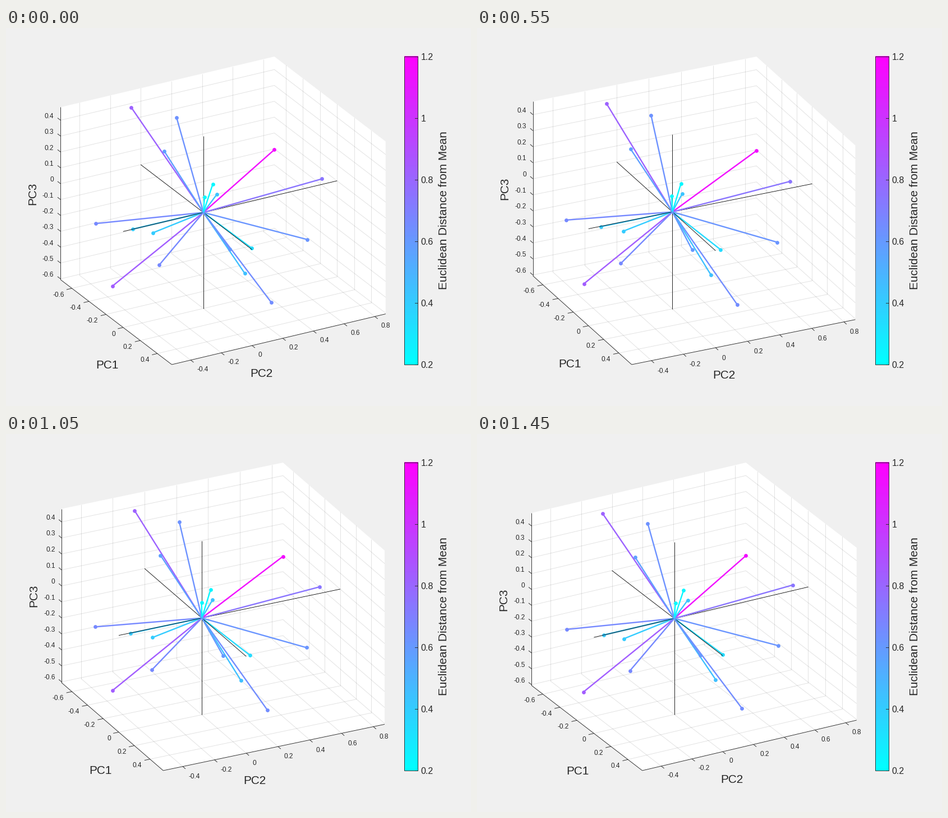
A matplotlib script that plays this animation: 829 by 675 pixels, repeating every 1500 ms.

```python
import numpy as np
import matplotlib.pyplot as plt
from matplotlib.animation import FuncAnimation
from matplotlib.collections import LineCollection

W, H, DPI = 829, 675, 100
PX = 72 / DPI
FRAMES, INTERVAL = 30, 50
INK = (0.15, 0.15, 0.15)

# Data limits of PC1, PC2, PC3
LO = np.array([-0.733, -0.523, -0.605])
HI = np.array([0.569, 0.871, 0.482])
SPAN = HI - LO
TICKS = [np.arange(-6, 5, 2) / 10, np.arange(-4, 9, 2) / 10, np.arange(-6, 5) / 10]

ELEV = np.radians(25.2)
SE, CE = np.sin(ELEV), np.cos(ELEV)
AZ_START, AZ_STEP = 60.88, 0.346
TOP, BOTTOM, CENTRE_X = 51, 601, 387

# Stem ends seen half way through the turn: right px, down px, depth in data units
STEMS = [
    (-121.4, -191, 0.609), (-41.5, -171, 0.491), (-73, -111.5, -0.2),
    (15.8, -50.5, -0.076), (0, -28, -0.15), (20, -32.5, -0.333),
    (141.5, -110.5, 1.05), (210.5, -56.5, -0.162), (186.3, 52, -0.025),
    (86, 66, -0.087), (39.5, 67, -0.585), (70.5, 111, -0.3),
    (117.5, 163.5, -0.318), (-87, 92.5, -0.6), (-159.5, 129.5, 0.299),
    (-88.3, 35, 0.194), (-126.6, 27.5, -0.018), (-190.7, 16.5, 0.221),
]


class View:
    """Orthographic camera that fits the box to a fixed height."""

    def __init__(self, azimuth):
        a = np.radians(azimuth)
        self.c, self.s = c, s = np.cos(a), np.sin(a)
        self.k = (BOTTOM - TOP) / (SPAN @ [s * SE, c * SE, CE])
        self.axes = self.k * np.array([[c, s * SE], [s, -c * SE], [0, -CE]])
        left = CENTRE_X - self.k * (SPAN @ [c, s, 0]) / 2
        highest = np.array([LO[0], HI[1], HI[2]])
        self.origin = np.array([left - LO @ self.axes[:, 0],
                                TOP - highest @ self.axes[:, 1]])

    def project(self, points):
        return self.origin + np.asarray(points, float) @ self.axes

    def depth(self, p):
        return p[1] * self.c - p[0] * self.s


def to_data(right, down, deep):
    p, y = right / MID.k, down / MID.k
    return (p * MID.c - deep * MID.s, p * MID.s + deep * MID.c,
            -(y + deep * SE) / CE)


def swing(i):
    return i if i <= 14 else 29.5 - i


def point(axis, value, base):
    p = np.array(base, float)
    p[axis] = value
    return p


def grid_segments():
    """Lines on the two back walls and the floor."""
    corner = np.array([LO[0], HI[1], LO[2]])
    far = np.array([HI[0], LO[1], HI[2]])
    segs = []
    for axis in range(3):
        for other in range(3):
            if other != axis:
                for v in TICKS[axis]:
                    p = point(axis, v, corner)
                    segs.append((p, point(other, far[other], p)))
    return np.array(segs)


MID = View(AZ_START + 7 * AZ_STEP)
ends = [np.array(to_data(*s)) for s in STEMS]
half_axes = [point(a, lim[a], (0, 0, 0)) for a in range(3) for lim in (LO, HI)]
GRID = grid_segments()

# Ruler edges: base point, tick axis, tick sign
RULERS = [
    ((0, LO[1], LO[2]), 1, -1),
    ((HI[0], 0, LO[2]), 0, 1),
    ((LO[0], LO[1], 0), 0, -1),
]
EDGES = np.array([(point(a, LO[a], r[0]), point(a, HI[a], r[0]))
                  for a, r in enumerate(RULERS)])
OUTLINE = np.array([(LO[0], LO[1], LO[2]), (LO[0], LO[1], HI[2]),
                    (LO[0], HI[1], HI[2]), (HI[0], HI[1], HI[2]),
                    (HI[0], HI[1], LO[2]), (HI[0], LO[1], LO[2])])

# The small surplus keeps the pixel size from rounding down
fig = plt.figure(figsize=((W + 0.01) / DPI, (H + 0.01) / DPI), dpi=DPI,
                 facecolor="#f0f0f0")
ax = fig.add_axes([0, 0, 1, 1])
ax.axis("off")


def label(x, y, text, size, ha="center", rotation=0):
    return ax.text(x, y, text, fontsize=size * PX, family="Liberation Sans", color=INK,
                   ha=ha, va="baseline", rotation=rotation, rotation_mode="anchor")


def lines(width, color, alpha, z):
    return ax.add_collection(LineCollection([], linewidths=width * PX, colors=[color],
                                            alpha=alpha, zorder=z), autolim=False)


def draw_colorbar():
    x0, x1 = 709.5, 734
    ramp = np.linspace(1, 0, 256)[:, None]
    ax.imshow(ramp, cmap="cool", extent=(x0, x1, BOTTOM, TOP), aspect="auto",
              interpolation="nearest", zorder=1)
    ax.add_patch(plt.Rectangle((x0, TOP), x1 - x0, BOTTOM - TOP, fill=False,
                               ec=INK, lw=0.9 * PX, zorder=2))
    for n in range(6):
        y = BOTTOM - 110 * n
        ax.plot([x1 - 5.5, x1], [y, y], color=INK, lw=0.9 * PX, zorder=2)
        label(739.5, y + 5.6, f"{(2 + 2 * n) / 10:g}", 16, "left")
    label(786, 326, "Euclidean Distance from Mean", 20.8, rotation=90)


draw_colorbar()
walls = ax.fill([0, 1, 1], [0, 0, 1], color="white", lw=0, zorder=0)[0]
grid = lines(0.9, INK, 0.14, 1)
rulers = lines(0.9, INK, 1, 2)

spokes = []
for end in half_axes:
    spokes.append((end, ax.plot([], [], color="black", lw=0.85 * PX,
                                solid_capstyle="butt")[0]))
for end in ends:
    color = plt.cm.cool(np.clip(np.linalg.norm(end) - 0.2, 0, 1))
    spokes.append((end, ax.plot([], [], color=color, lw=2.4 * PX, marker="o",
                                ms=6.8 * PX, mew=0, markevery=[1],
                                solid_capstyle="butt")[0]))

SIDES = ["right", "left", "right"]
tick_labels = [[label(0, 0, f"{v:g}", 11.9, SIDES[a]) for v in TICKS[a]]
               for a in range(3)]
names = [label(0, 0, f"PC{a + 1}", 20.8, rotation=90 if a == 2 else 0)
         for a in range(3)]
ax.set_xlim(0, W)
ax.set_ylim(H, 0)


def draw(i):
    step = swing(i)
    u = step / 14
    view = View(AZ_START + AZ_STEP * step)
    walls.set_xy(view.project(OUTLINE))
    grid.set_segments(view.project(GRID))

    segs = list(view.project(EDGES))
    gaps = [(-4.5, 8.4), (6, 12 + 1.7 * u), (-6.6, -3.7 - 0.5 * u)]
    for a, (base, along, sign) in enumerate(RULERS):
        tick = sign * 0.025 * SPAN[1] * view.axes[along] / np.hypot(view.c, view.s)
        for v, text in zip(TICKS[a], tick_labels[a]):
            start = view.project(point(a, v, base))
            segs.append(np.array([start, start + tick]))
            x, y = start + tick + gaps[a]
            text.set_position((x, y + 4.1))
    rulers.set_segments(segs)

    # Nearer spokes cover those behind them
    for end, line in spokes:
        tip = view.project(end)
        line.set_data(*np.array([view.origin, tip]).T)
        line.set_zorder(10 - view.depth(end) * 100 / np.hypot(*(tip - view.origin)))

    names[0].set_position((180.2 - 18.6 * u, 607.8 - 2 * u))
    names[1].set_position((455 - 19 * u, 622.7 + 4.3 * u))
    names[2].set_position((53.5 + 2.8 * u, 296 - 11.2 * u))
    return []


anim = FuncAnimation(fig, draw, frames=FRAMES, interval=INTERVAL, repeat=True,
                     repeat_delay=0, blit=False)
plt.show()
```
